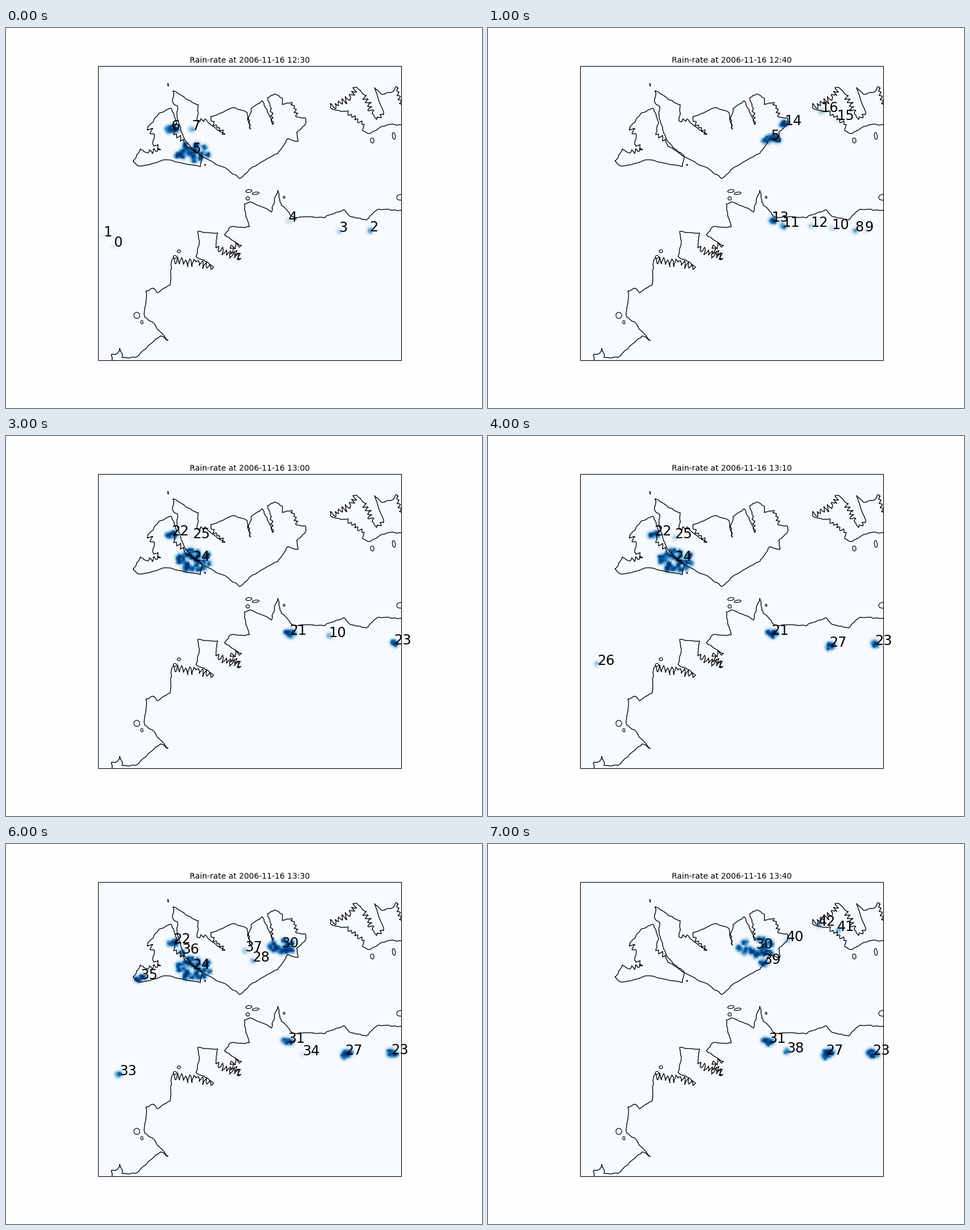
Write a matplotlib script that moves like this. It is 837 by 669 pixels and loops after 8 s.

```python
import numpy as np
import matplotlib.pyplot as plt
from matplotlib.animation import FuncAnimation
from matplotlib.patches import Ellipse, Rectangle

W, H, DPI = 837, 669, 72
LEFT, RIGHT, TOP, BOTTOM = 162.4, 695.5, 66.9, 585.4
SCENES = 8
CELL = 4  # rain grid spacing in pixels

# Coast key points; a third value makes the stretch that follows fjord-like
WEST_ISLAND = [
    (224, 234), (236, 213), (250, 220, 5), (272, 214, 5), (258, 204), (260, 186, 6),
    (250, 173), (268, 151), (290, 141), (300, 166), (295, 188, 5), (312, 196), (316, 208),
    (345, 226), (342, 244), (283, 232), (233, 243), (224, 234)]
MAIN_ISLAND = [
    (294, 111), (293, 131), (302, 138), (301, 159), (316, 200), (346, 227), (391, 250),
    (411, 265), (433, 245), (478, 221), (495, 195), (513, 200), (511, 184), (527, 168),
    (527, 159), (514, 157, 4), (503, 131), (486, 135), (486, 124), (473, 116), (460, 123),
    (465, 139, 3), (469, 170), (461, 150), (450, 128), (431, 142), (426, 160, 2), (430, 178),
    (424, 149), (400, 140), (360, 156), (361, 164, 4), (385, 187), (361, 171), (350, 160, 4),
    (336, 164), (338, 135), (320, 127), (294, 111)]
EAST_ISLAND = [
    (698, 169), (669, 171), (640, 186), (627, 180), (630, 170, 4), (597, 147), (571, 141, 8),
    (606, 123, 5), (616, 104), (629, 117, 6), (644, 150), (652, 161, 4), (664, 148),
    (648, 105), (661, 117), (680, 112), (686, 103, 4), (698, 139)]
MAINLAND = [
    (187, 587), (185, 575), (196, 573), (200, 564), (204, 580), (228, 580), (262, 549),
    (272, 542), (285, 550), (257, 517), (244, 509), (246, 463), (258, 458), (266, 466),
    (289, 452), (291, 412, 9), (334, 412, 8), (365, 421), (334, 402), (340, 375), (337, 358),
    (372, 361), (369, 387, 8), (413, 406, 7), (394, 388, 7), (414, 383), (384, 364),
    (395, 350), (428, 350), (425, 340), (419, 310), (428, 306), (467, 324), (472, 300),
    (478, 286), (484, 312), (505, 333), (560, 334), (594, 320), (604, 331), (634, 338),
    (655, 319), (677, 321), (698, 321)]
# x, y, width, height
ISLETS = [(427, 287, 11, 5), (439, 291, 12, 4), (425, 300, 6, 6), (489, 298, 3, 4),
          (297, 403, 6, 5), (304, 393, 6, 5), (350, 241, 2, 2), (230, 506, 10, 11),
          (239, 518, 4, 6), (644, 198, 6, 9), (682, 190, 5, 12), (694, 298, 14, 10),
          (285, 100, 1, 5)]

# New storms of each scene as (x, y, size), numbered in this order
BORN = [
    [(189, 385, 2.5), (171, 367, 2), (639, 358, 6), (585, 359, 4.5), (497, 341, 4),
     (327, 220, 22), (290, 180, 11), (327, 180, 6)],
    [(645, 358, 6), (663, 358, 3), (604, 354, 4), (517, 350, 7), (567, 350, 4.5),
     (498, 341, 7.5), (521, 171, 9), (613, 162, 3), (585, 148, 5)],
    [(498, 350, 8), (604, 363, 3.5), (650, 367, 4.5), (684, 367, 6)],
    [(498, 350, 10), (291, 175, 9), (682, 367, 8), (328, 220, 26), (328, 180, 3)],
    [(192, 403, 5), (600, 371, 9)],
    [(433, 207, 5), (461, 189, 9), (498, 180, 12), (498, 350, 10), (558, 350, 3)],
    [(199, 407, 7), (521, 372, 3), (236, 238, 9), (309, 193, 7), (420, 189, 5)],
    [(525, 367, 7), (484, 211, 8), (525, 171, 5), (614, 153, 6), (581, 144, 5.5)]]
# Storms that last: number -> extra scenes, then dx, dy and growth per scene
LASTING = {5: (1, 170, -23, -9), 10: (2, -18.5, 0, 1), 21: (1, 0, 0, 0), 22: (3, 1, 0, 0),
           23: (4, -1.5, 1, 0.8), 24: (3, 0, 0, 0), 25: (2, 0, 0, 1), 27: (3, -2, 0, 1),
           28: (1, 0, 0, 0.5), 30: (2, -14, 2, 6), 31: (2, -2.5, 0, 0.5)}


def side_steps(a, b):
    step = b - a
    return np.array([-step[1], step[0]]) / np.hypot(*step)


def trace(keys, rng):
    """Join key points, cut in the fjords, then kink every segment."""
    pts = []
    for a, b in zip(keys, keys[1:]):
        start, end = np.array(a[:2], float), np.array(b[:2], float)
        pts.append(start)
        if len(a) == 3:
            n = max(3, int(np.hypot(*(end - start)) / 3.5))
            for k in range(1, n):
                push = (-1) ** k * a[2] * rng.uniform(0.3, 1)
                pts.append(start + (end - start) * k / n + side_steps(start, end) * push)
    pts.append(np.array(keys[-1][:2], float))
    for _ in range(3):
        kinked = [pts[0]]
        for a, b in zip(pts, pts[1:]):
            reach = min(0.13 * np.hypot(*(b - a)), 1.3)
            kinked += [(a + b) / 2 + side_steps(a, b) * rng.uniform(-reach, reach), b]
        pts = kinked
    return np.array(pts)


def storms_at(scene):
    """Yield number, x, y and size of each storm alive in a scene."""
    number = 0
    for birth, storms in enumerate(BORN):
        for x, y, size in storms:
            life, dx, dy, growth = LASTING.get(number, (0, 0, 0, 0))
            age = scene - birth
            if 0 <= age <= life:
                yield number, x + dx * age, y + dy * age, size + growth * age
            number += 1


def rain_field(scene):
    """Each storm is a loose, flat cluster of round showers."""
    field = np.zeros(GX.shape)
    for number, x, y, size in storms_at(scene):
        rng = np.random.default_rng(number)
        spread = max(size - 5, 0)
        strength = min((size / 7.5) ** 2, 1.1)
        for _ in range(1 + int(1.4 * spread)):
            angle, far = rng.uniform(0, 2 * np.pi), np.sqrt(rng.uniform())
            cx = x + 1.7 * spread * far * np.cos(angle)
            cy = y + 0.9 * spread * far * np.sin(angle)
            d2 = ((GX - cx) ** 2 + (GY - cy) ** 2) / 5.5 ** 2
            field = np.maximum(field, strength * np.exp(-d2 ** 1.3))
    grain = np.random.default_rng(scene).uniform(0.7, 1.3, field.shape)
    return np.clip(field * grain, 0, 1)


GX, GY = np.meshgrid(np.arange(LEFT + CELL / 2, RIGHT, CELL),
                     np.arange(TOP + CELL / 2, BOTTOM, CELL))
fields = [rain_field(scene) for scene in range(SCENES)]

plt.rcParams["font.family"] = "DejaVu Sans"
fig = plt.figure(figsize=(W / DPI, H / DPI), dpi=DPI, facecolor="#fefefc")
ax = fig.add_axes([0, 0, 1, 1])
ax.axis("off")
image = ax.imshow(fields[0], cmap="Blues", vmin=0, vmax=1, interpolation="bilinear",
                  extent=(LEFT, RIGHT, BOTTOM, TOP), aspect="auto", zorder=1)
ax.set_xlim(0, W)
ax.set_ylim(H, 0)

border = Rectangle((LEFT, TOP), RIGHT - LEFT, BOTTOM - TOP, fill=False, ec="black",
                   lw=1.1, zorder=4)
ax.add_patch(border)
rng = np.random.default_rng(4)
for keys in (WEST_ISLAND, MAIN_ISLAND, EAST_ISLAND, MAINLAND):
    line, = ax.plot(*trace(keys, rng).T, color="black", lw=1.35, zorder=3)
    line.set_clip_path(border)
for x, y, w, h in ISLETS:
    islet = Ellipse((x, y), w, h, angle=-8, fill=False, ec="black", lw=1.2, zorder=3)
    ax.add_patch(islet)
    islet.set_clip_path(border)

title = ax.text((LEFT + RIGHT) / 2, 61, "", size=13.9, ha="center", va="baseline")
most = max(len(list(storms_at(scene))) for scene in range(SCENES))
labels = [ax.text(0, 0, "", size=24, va="baseline", zorder=5) for _ in range(most)]


def draw(scene):
    hour, minute = divmod(12 * 60 + 30 + 10 * scene, 60)
    title.set_text(f"Rain-rate at 2006-11-16 {hour}:{minute:02d}")
    image.set_data(fields[scene])
    for label in labels:
        label.set_text("")
    for label, (number, x, y, _) in zip(labels, storms_at(scene)):
        label.set_text(str(number))
        label.set_position((x, y))
    return [image, title, *labels]


anim = FuncAnimation(fig, draw, frames=SCENES, interval=1000, repeat=True,
                     repeat_delay=0)
plt.show()
```
